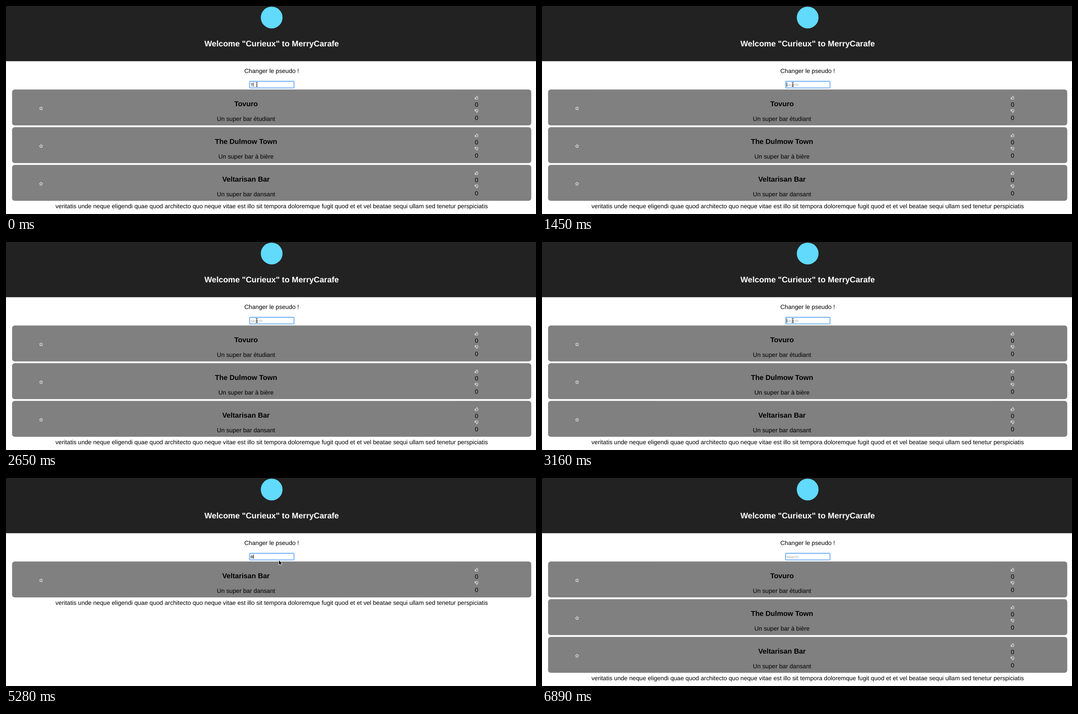
An HTML page that plays this animation: 1194x469 px, repeating every 6.99 s.

```html
<!DOCTYPE html>
<html lang="fr">
<head>
<meta charset="utf-8">
<title>Bars</title>
<style>
  html, body { margin: 0; width: 100%; height: 100%; overflow: hidden; background: #fff; }
  svg { display: block; width: 100%; height: 100%; }
  text { font: 13.67px "Liberation Sans", Arial, sans-serif; text-anchor: middle; text-rendering: geometricPrecision; }
  .title { font-size: 18.2px; font-weight: bold; fill: #fff; }
  .name { font-size: 16px; font-weight: bold; }
  #field { font-size: 9px; text-anchor: start; }
  .icon { fill: none; stroke: #fff; stroke-width: .9; stroke-linejoin: round; }
</style>
</head>
<body>
<svg viewBox="0 0 1194 469">
  <defs>
    <path id="star" class="icon" d="M0-3.8L1.1-1.3 3.8-1 1.8.8 2.4 3.5 0 2.1-2.4 3.5-1.8.8-3.8-1-1.1-1.3Z"/>
    <path id="thumb" class="icon" d="M-3.6-.2H-1.6L.2-2.3 .5-3.9Q1.9-4 1.6-2L1.2-.6H3.3Q4-.2 3.5.8L2.9 2.8Q2.6 3.5 1.8 3.5H.2L-1.6 3H-3.6ZM-1.6-.2V3"/>
  </defs>
  <rect width="1194" height="124.5" fill="#222"/>
  <circle cx="598.5" cy="26" r="24.5" fill="#61dafb"/>
  <text class="title" x="598.5" y="91">Welcome "Curieux" to MerryCarafe</text>
  <text x="598.5" y="151">Changer le pseudo !</text>
  <rect x="548.8" y="169.8" width="100" height="14.8" rx="1.5" fill="#fff" stroke="#b5d6fb" stroke-width="2.6"/>
  <rect x="549" y="170" width="99.6" height="14.4" rx="1" fill="#fff" stroke="#5ea5f2" stroke-width="1.4"/>
  <text id="field" x="551" y="180.5"></text>
  <rect id="caret" y="172.3" width="1" height="9.8"/>
  <g id="cards"></g>
  <text id="footer" x="598.5">veritatis unde neque eligendi quae quod architecto quo neque vitae est illo sit tempora doloremque fugit quod et et vel beatae sequi ullam sed tenetur perspiciatis</text>
  <path id="beam" d="M562.8 172.2Q565 172.2 565 173.6Q565 172.2 567.2 172.2M565 173.4V180.8M562.8 182Q565 182 565 180.6Q565 182 567.2 182M563.8 177.6H566.2" fill="none" stroke="#111"/>
  <path id="arrow" d="M0 0V11.3L2.6 8.9 4.4 12.8 6.3 12 4.6 8.2H8.2Z" fill="#000" stroke="#fff" stroke-width=".9"/>
</svg>
<script>
const LOOP = 6990;
const $ = id => document.getElementById(id);
const show = (el, on) => el.setAttribute('display', on ? 'inline' : 'none');

const bars = [
  ['Tovuro', 'Un super bar étudiant'],
  ['The Dulmow Town', 'Un super bar à bière'],
  ['Veltarisan Bar', 'Un super bar dansant']
];

// Content of the search field from each time on
const typing = [
  [0, 'T'], [180, 'To'], [420, 'Tov'], [780, 'Tovu'], [1120, 'Tov'], [1200, 'To'], [1300, 'T'], [1400, ''],
  [1560, 'D'], [1680, 'Du'], [1880, 'D'], [1980, ''],
  [3300, 'V'], [3450, 'Ve'], [3740, 'V'], [3860, ''],
  [3980, 'B'], [4100, 'Ba'], [4300, 'Bar'], [4800, 'Ba'], [5220, 'B'], [5520, '']
];
const caretOff = [[2090, 2990], [6700, LOOP]];

// Pointer path: time, x, y
const path = [[4700, 565, 177], [5000, 614, 187], [5160, 614.5, 185], [5340, 614.5, 185], [5860, 978, 440]];
const pointerGone = 5920;

$('cards').innerHTML = bars.map(([name, about]) => `<g>
  <rect x="13.7" y="188.3" width="1169.6" height="81" rx="6" fill="#808080"/>
  <use href="#star" x="79" y="230.8"/>
  <text class="name" x="540.7" y="226">${name}</text>
  <text x="540.7" y="259">${about}</text>
  <use href="#thumb" x="1060" y="206.8"/>
  <text x="1060" y="226.5">0</text>
  <use href="#thumb" transform="translate(1060 236.6) scale(1 -1)"/>
  <text x="1060" y="256.5">0</text>
</g>`).join('');
const cards = [...$('cards').children];

function pointerAt(t) {
  const i = path.findIndex(p => p[0] > t);
  if (i < 0) return path[path.length - 1].slice(1);
  if (i === 0) return path[0].slice(1);
  const [a, b] = [path[i - 1], path[i]];
  let k = (t - a[0]) / (b[0] - a[0]);
  k = k * k * (3 - 2 * k);
  return [a[1] + (b[1] - a[1]) * k, a[2] + (b[2] - a[2]) * k];
}

function draw(t) {
  const query = typing.filter(k => k[0] <= t).pop()[1];
  const field = $('field');
  field.textContent = query || 'search';
  field.setAttribute('fill', query ? '#000' : '#a9a9a9');
  $('caret').setAttribute('x', 551 + (query ? field.getComputedTextLength() : 0));
  show($('caret'), !caretOff.some(([from, to]) => t >= from && t < to));

  let count = 0;
  cards.forEach((card, i) => {
    const match = bars[i][0].toLowerCase().includes(query.toLowerCase());
    show(card, match);
    if (match) card.setAttribute('transform', `translate(0 ${85 * count++})`);
  });
  $('footer').setAttribute('y', 201 + 85 * count);

  const [x, y] = pointerAt(t);
  const inField = t < 5160 && y < 184;
  show($('beam'), inField);
  show($('arrow'), !inField && t < pointerGone);
  $('beam').setAttribute('transform', `translate(${x - 565} ${y - 177})`);
  $('arrow').setAttribute('transform', `translate(${x} ${y})`);
}

function tick() {
  draw(performance.now() % LOOP);
  requestAnimationFrame(tick);
}
tick();
</script>
</body>
</html>
```
